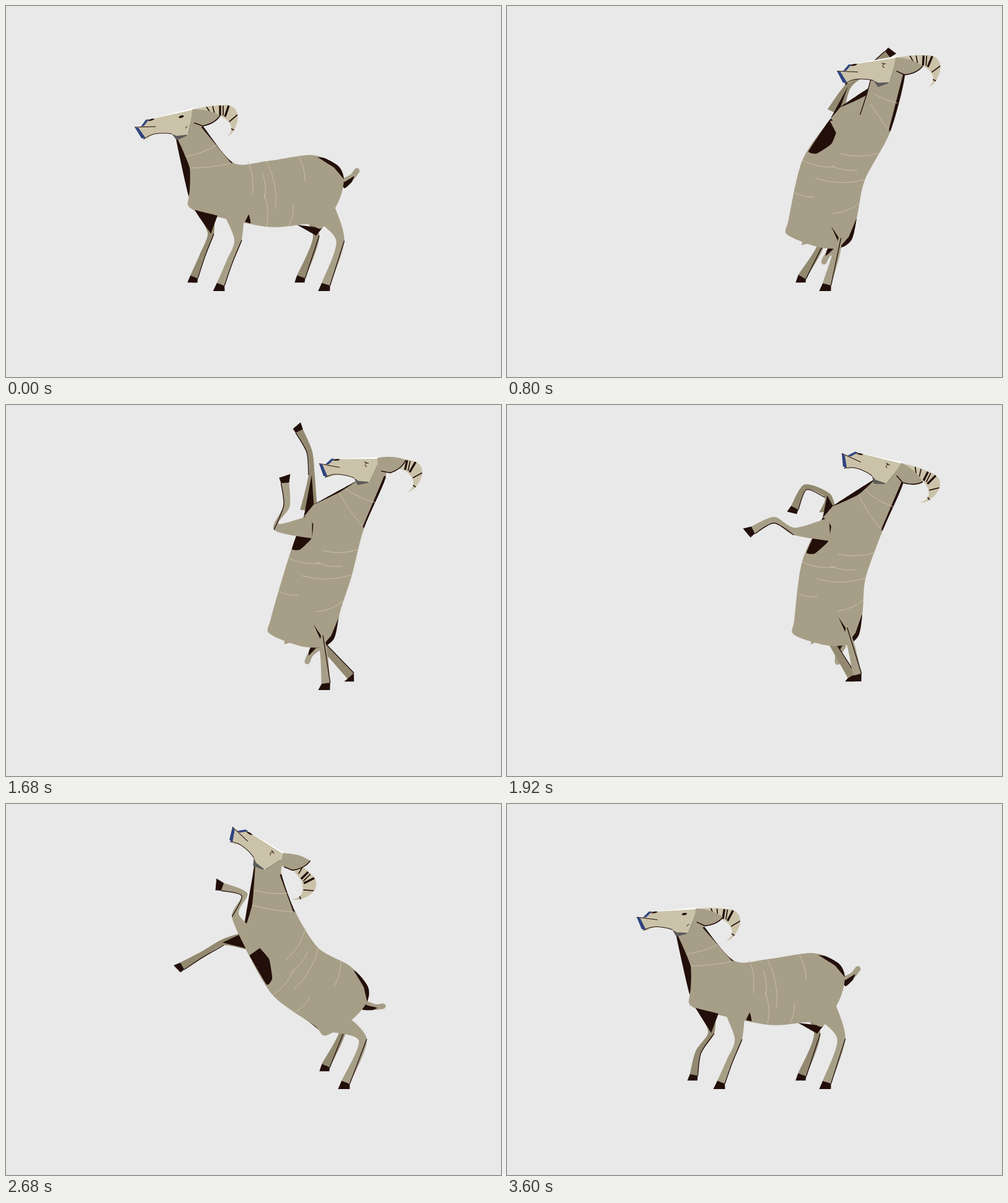
An HTML page with a canvas for the animation above (3640 ms loop, 800 px wide and 600 px high).

```html
<!DOCTYPE html>
<html lang="en">
<head>
<meta charset="utf-8">
<title>Dancing ram</title>
<style>
html, body { margin: 0; width: 100%; height: 100%; overflow: hidden; background: #e9e9e9; }
canvas { display: block; }
</style>
</head>
<body>
<canvas id="stage" width="800" height="600"></canvas>
<script>
const ctx = document.getElementById('stage').getContext('2d');
const LOOP = 3640, STEP = 40, RAD = Math.PI / 180;
const BG = '#e9e9e9', COAT = '#a79e87', FAR = '#928970', FACE = '#cbc3a9',
      DARK = '#230f0a', BLUE = '#2f4380', GREY = '#5c5b5b', CREASE = '#cbbfa8';

const lerp = (a, b, k) => a + (b - a) * k;
const clamp = v => Math.max(0, Math.min(1, v));
const between = (p, q, k) => [lerp(p[0], q[0], k), lerp(p[1], q[1], k)];
// Turns a point of a rotated part into a stage point.
const frame = (x, y, deg) => {
  const c = Math.cos(deg * RAD), s = Math.sin(deg * RAD);
  return (u, v) => [x + u * c - v * s, y + u * s + v * c];
};

// A pose is three slices of the trunk (x, y, angle), the head (x, y, tilt, ear),
// the tail angle and the knee and ankle of both front legs.
const pose = (chest, mid, hip, head, tail, near, far) => ({ chest, mid, hip, head, tail: [tail], near, far });
const stand = pose([336,292,39], [421,304,0], [491,297,4], [302,167,0,0], -38, [375,378,347,450], [331,368,304,438]);
const lean = pose([571,193,102], [528,265,107], [511,340,85], [629,83,4,5], 132, [575,180,598,106], [551,130,615,78]);
const arch = pose([515,184,71], [527,283,73], [566,325,53], [523,79,28,50], -46, [491,140,482,71], [492,135,497,90]);
const wave = pose([530,190,101], [508,261,105], [484,340,85], [604,86,12,-8], 128, [437,197,451,126], [494,113,474,42]);
const kick = pose([592,197,104], [552,274,103], [562,336,77], [678,103,43,72], 88, [500,214,434,245], [560,220,498,259]);
const rear = pose([427,203,55], [468,271,44], [527,310,31], [453,83,45,3], 8, [371,181,350,134], [350,224,285,262]);
const rest = { ...stand, head: [307,169,9,5], near: [374,380,346,450], far: [330,370,302,438] };

const mix = (a, b, k) => Object.fromEntries(
  Object.keys(a).map(p => [p, a[p].map((v, i) => lerp(v, b[p][i], k))]));
const shift = (base, dx, dy, parts = ['chest', 'mid', 'hip', 'head']) => {
  const out = { ...base };
  for (const p of parts) out[p] = base[p].map((v, i) => v + (i === 0 ? dx : i === 1 ? dy : 0));
  return out;
};

const tracks = {};
function key(t, p) {
  for (const part in p) (tracks[part] ||= []).push([t, p[part]]);
}
key(0, stand);
key(160, shift(shift(stand, -10, 5), -10, 2, ['head']));
key(320, mix(stand, rear, .7));
key(560, { ...shift(mix(rear, lean, .5), 0, 8), near: [456,192,385,179], far: [470,142,425,100] });
key(800, lean);
key(1060, { ...mix(lean, arch, .55), far: [515,118,545,45] });
key(1320, arch);
key(1500, { ...mix(arch, wave, .5), near: [436,214,364,228] });
key(1680, wave);
key(1940, { ...mix(wave, kick, .5), near: [467,205,397,207], far: [520,150,465,175] });
key(2200, kick);
key(2300, shift(kick, 14, 4));
key(2480, shift(mix(kick, rear, .5), 0, -16));
key(2680, rear);
key(2800, { ...mix(rear, stand, .7), near: [352,332,300,370], far: [310,322,238,350] });
key(2960, shift(shift(stand, -4, 4), -8, 6, ['head']));
key(3360, shift(rest, -1, 3, ['head']));
key(3600, rest);

// Monotone cubic in time: no overshoot, resting parts stay put.
function sample(track, t) {
  let i = 0;
  while (i < track.length - 2 && t >= track[i + 1][0]) i++;
  const [t0, a] = track[i], [t1, b] = track[i + 1], h = t1 - t0;
  const u = clamp((t - t0) / h), u2 = u * u, u3 = u2 * u;
  const rate = (n, j) => (track[n + 1][1][j] - track[n][1][j]) / (track[n + 1][0] - track[n][0]);
  const slope = (n, j) => {
    if (n < 1 || n > track.length - 2) return 0;
    const p = rate(n - 1, j), q = rate(n, j);
    return p * q > 0 ? 2 * p * q / (p + q) : 0;
  };
  return a.map((v, j) => v * (2 * u3 - 3 * u2 + 1) + b[j] * (3 * u2 - 2 * u3)
    + h * (slope(i, j) * (u3 - 2 * u2 + u) + slope(i + 1, j) * (u3 - u2)));
}

// Hind feet stay planted and walk in arcs: start, end, new x.
function foot(t, x, y, steps) {
  for (const [from, to, next] of steps) {
    const u = clamp((t - from) / (to - from));
    x = lerp(x, next, u * u * (3 - 2 * u));
    y -= 15 * Math.sin(Math.PI * u);
  }
  return [x, y];
}
const nearFoot = t => foot(t, 517, 450, [[1700, 2060, 591], [2300, 2600, 549], [2720, 2960, 517]]);
const farFoot = t => foot(t, 477, 438, [[880, 1240, 557], [2520, 2840, 477]]);

// The bent joint between two ends of a limb.
function joint(a, b, l1, l2, side) {
  const dx = b[0] - a[0], dy = b[1] - a[1], d = Math.hypot(dx, dy);
  if (d >= l1 + l2) return between(a, b, l1 / (l1 + l2));
  const along = (l1 * l1 - l2 * l2 + d * d) / (2 * d);
  const out = side * Math.sqrt(Math.max(0, l1 * l1 - along * along));
  return [a[0] + (dx * along - dy * out) / d, a[1] + (dy * along + dx * out) / d];
}

function curve(path, pts, closed, k = .14, join = false) {
  const n = pts.length;
  const at = i => closed ? pts[(i + n) % n] : pts[Math.max(0, Math.min(n - 1, i))];
  path[join ? 'lineTo' : 'moveTo'](...pts[0]);
  for (let i = 0; i < (closed ? n : n - 1); i++) {
    const [p, a, b, q] = [at(i - 1), at(i), at(i + 1), at(i + 2)];
    path.bezierCurveTo(a[0] + (b[0] - p[0]) * k, a[1] + (b[1] - p[1]) * k,
      b[0] - (q[0] - a[0]) * k, b[1] - (q[1] - a[1]) * k, b[0], b[1]);
  }
  return path;
}
const blob = (pts, k) => curve(new Path2D(), pts, true, k);
const line = pts => curve(new Path2D(), pts, false);
const poly = pts => blob(pts, 0);
function fill(path, color) { ctx.fillStyle = color; ctx.fill(path); }
function stroke(path, color, width) {
  ctx.strokeStyle = color; ctx.lineWidth = width; ctx.stroke(path);
}

function leg(pts, widths, color, size) {
  const n = pts.length, side = [[], []];
  pts.forEach((p, i) => {
    const a = pts[Math.max(0, i - 1)], b = pts[Math.min(n - 1, i + 1)];
    const dx = b[0] - a[0], dy = b[1] - a[1], w = widths[i] / 2 / (Math.hypot(dx, dy) || 1);
    side[0].push([p[0] - dy * w, p[1] + dx * w]);
    side[1].push([p[0] + dy * w, p[1] - dx * w]);
  });
  const shape = curve(new Path2D(), side[0], false);
  curve(shape, [...side[1]].reverse(), false, .14, true);
  fill(shape, color);
  stroke(line(side[1].slice(1)), DARK, 1.3);

  // The hoof follows the leg in the air and lies flat on the ground.
  const [x, y] = pts[n - 1], [px, py] = pts[n - 2];
  const air = clamp((446 - y) / 60) * (n > 3);
  const sole = frame(x, y, (Math.atan2(px - x, y - py) / RAD - 14) * air);
  fill(poly([side[0][n - 1], sole(-12.5 * size, 11 * size), sole(6.5 * size, 11 * size), side[1][n - 1]]), DARK);
}

const svg = d => new Path2D(d);
const horn = svg('M304 167Q330 160 356 160C374 161 378 178 372 193Q367 208 357 211Q365 205 364 195Q361 184 346 178L304 174Z');
const thin = svg('M324 163l6 9M334 162l3 12M351 161l0 16M374 176l-13 11M369 201l-6-3');
const thick = svg('M346 161l0 16M360 161l-6 18');
const face = svg('M236 183L302 167L299 185L294 208L276 210Q268 206 255 205Q238 205 229 214L222 215L213 197L222 193L229 184Z');
const jaw = svg('M267 206L276 217L292 210L301 176L295 206L276 210Z');
const shine = svg('M236 182L303 165L303 167.5L270 175Z');
const lips = svg('M208 196L214 197L226 214L219 214ZM218 195L226 184L231 183L223 194Z');
const mouth = svg('M208 196L242 195M222 216Q232 207 246 206T268 207');
const nostril = svg('M229 186q3-4 11-4q-2 4-11 4');
const openEye = svg('M279 180q3-4 8-3q1 3-4 4q-3 1-4-1M280 183l3 2');
const shutEye = svg('M279 178l7 1M281 183l3 2M283 178l-2 4');
const cheek = svg('M290 198l3-4');
const ear = svg('M1-8Q27-9 46 2Q38 15 18 19L-1 12Z');
const earEdge = svg('M46 2Q38 15 18 19L4 14');

function drawHead([x, y, tilt, earTilt], open) {
  ctx.save();
  ctx.translate(x, y);
  ctx.rotate(tilt * RAD);
  ctx.translate(-302, -167);
  fill(horn, FACE);
  ctx.save();
  ctx.clip(horn);
  stroke(thin, DARK, 1.7);
  stroke(thick, DARK, 3.4);
  ctx.restore();
  fill(jaw, GREY);
  fill(face, FACE);
  fill(shine, '#fff');
  fill(lips, BLUE);
  stroke(mouth, DARK, 1);
  fill(nostril, DARK);
  if (open) fill(openEye, DARK);
  stroke(open ? cheek : shutEye, DARK, 1);
  ctx.translate(300, 175);
  ctx.rotate((earTilt - tilt) * RAD);
  fill(ear, COAT);
  stroke(earEdge, DARK, 1.6);
  ctx.restore();
}

function drawTail([x, y], angle) {
  const at = frame(x, y, angle);
  ctx.lineCap = 'round';
  stroke(line([at(2, -1), at(17, 2), at(29, -1)]), COAT, 9);
  ctx.lineCap = 'butt';
  fill(blob([at(-4, -6), at(3, 1), at(20, 3), at(12, 8), at(-4, 9)], .08), DARK);
}

function fold(a, b, bow) {
  const dx = b[0] - a[0], dy = b[1] - a[1], path = new Path2D();
  path.moveTo(...a);
  path.quadraticCurveTo((a[0] + b[0]) / 2 - dy * bow, (a[1] + b[1]) / 2 + dx * bow, ...b);
  stroke(path, CREASE, 1);
}

function draw(t) {
  const p = {};
  for (const part in tracks) p[part] = sample(tracks[part], t);
  const slices = [[p.chest, 49.5], [p.mid, 53], [p.hip, 56]];
  const top = slices.map(([s, r]) => frame(...s)(0, -r));
  const low = slices.map(([s, r]) => frame(...s)(0, r));
  const rail = (pts, u) => { const i = Math.min(1, Math.floor(u)); return between(pts[i], pts[i + 1], u - i); };

  // The skull, breast and pelvis are rigid.
  const skull = frame(...p.head.slice(0, 3));
  const breast = frame(p.chest[0], p.chest[1], p.chest[2] - 39);
  const pelvis = frame(p.hip[0], p.hip[1], p.hip[2] - 4);
  const throat = skull(-28, 43), nape = skull(16, 27);
  const neck = breast(-39, -30), front = breast(-41, 15);
  const rump = pelvis(44, -40), dock = pelvis(55, -17), seat = pelvis(47, 18), thigh = pelvis(20, 62);
  const body = blob([throat, skull(0, 10), nape, ...top, rump, dock, seat, thigh,
    low[2], low[1], low[0], front, neck]);

  const hind = (hip, end, shin) => { const knee = joint(hip, end, 55, shin, -1); return [hip, knee, end]; };
  const nearHind = hind(pelvis(22, 35), nearFoot(t), 74);
  const farHind = hind(pelvis(-16, 26), farFoot(t), 71);
  const fore = (root, [kx, ky, ax, ay]) => [root, [kx, ky], joint([kx, ky], [ax, ay], 37.5, 37.5, 1), [ax, ay]];
  const raised = a => clamp((445 - a[3]) / 200);
  const kn = raised(p.near), kf = raised(p.far);

  // Points along the belly, with a depth into the body.
  const [lx, ly] = low[0], bx = low[1][0] - lx, by = low[1][1] - ly, bl = Math.hypot(bx, by);
  const belly = (u, depth) => [lx + bx * u + by / bl * depth, ly + by * u - bx / bl * depth];
  const armA = between(low[0], front, kf), armB = between(belly(.33, 0), low[0], kf);
  const farFore = fore(between(armA, armB, .5), p.far);
  const nearFore = fore(belly(lerp(.5, .15, kn), 18), p.near);

  ctx.fillStyle = BG;
  ctx.fillRect(0, 0, 800, 600);
  drawTail(between(dock, seat, .15), p.tail[0]);
  leg(farHind, [10, 10, 14], FAR, .85);
  fill(poly([between(low[2], low[1], .25), thigh, farHind[1]]), DARK);
  leg(farFore, [28, 10, 9, 13], FAR, .85);

  fill(body, COAT);
  ctx.save();
  ctx.clip(body);
  fill(poly([between(top[2], rump, .2), pelvis(54, -48), pelvis(62, -17), dock, pelvis(39, -36)]), DARK);
  stroke(line([nape, top[0]]), DARK, 6);
  ctx.restore();

  fold(between(throat, neck, .65), between(nape, top[0], .5), .1);
  fold(neck, top[0], .06);
  for (const [u, v, s, e] of [[.45, .85, 0, .53], [1, 1.3, 0, .74], [.85, 1, .17, .57],
    [.87, 1, .5, 1], [1.8, 1.55, .7, 1], [1.7, 2.2, 0, .37]]) {
    const a = rail(top, u), b = rail(low, v);
    fold(between(a, b, s), between(a, b, e), -.15);
  }

  fill(blob([throat, neck, front], .08), DARK);
  fill(poly([armA, armB, farFore[1]]), DARK);
  fill(blob([belly(.78, 0), belly(.73, 13), belly(lerp(.7, .4, kn), 24 * kn),
    belly(lerp(.7, .08, kn), 18 * kn), belly(lerp(.7, 0, kn), 0)], .06), DARK);

  leg(nearHind, [40, 13, 14], COAT, 1);
  if (p.hip[2] > 45) {
    const [x, y] = nearHind[1];
    fill(poly([[x - 10, y - 22], [x + 2, y - 4], [x + 1, y + 2]]), DARK);
  }
  const nearLeg = () => leg(nearFore, [38, 12, 10, 13], COAT, 1);
  const over = t >= 1000;
  if (!over) nearLeg();
  drawHead(p.head, t < 240 || t > 2900);
  if (over) nearLeg();
}

const start = performance.now();
function tick() {
  const t = (performance.now() - start) % LOOP;
  draw(Math.floor(t / STEP) * STEP);
  requestAnimationFrame(tick);
}
tick();
</script>
</body>
</html>
```
